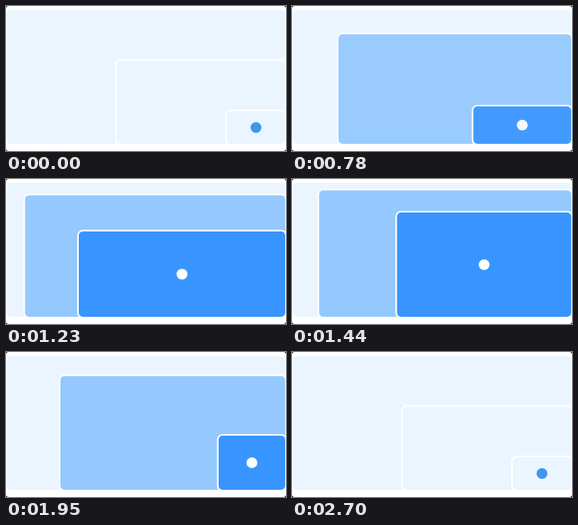
An HTML page with a canvas that plays this animation: 350x182 px, repeating every 2940 ms.

```html
<!DOCTYPE html>
<html lang="en">
<head>
<meta charset="utf-8">
<title>Nested cards</title>
<style>
  html, body { margin: 0; width: 100%; height: 100%; overflow: hidden; background: #000; }
  canvas { display: block; width: 350px; height: 182px; }
</style>
</head>
<body>
<canvas id="stage" width="350" height="182"></canvas>
<script>
const LOOP = 2940, RIGHT = 350, TOP = 4, BOTTOM = 174;
const ctx = document.getElementById('stage').getContext('2d');

const PALE = [235, 245, 255];
const MID = [149, 201, 253];
const BLUE = [56, 149, 255];
const DOT = [64, 149, 238];
const WHITE = [255, 255, 255];

// Dragged corner of the front card: time, x, y
const path = [
  [540, 275, 131], [780, 226, 125], [1020, 120, 100],
  [1230, 90, 65], [1440, 130, 41], [1700, 215, 52],
  [1950, 265, 104], [2280, 78, 111], [2610, 275, 131]
];

const lerp = (a, b, k) => a + (b - a) * k;
const ramp = (t, from, to) => Math.min(1, Math.max(0, (t - from) / (to - from)));
const smooth = k => k * k * (3 - 2 * k);
const mix = (a, b, k) => `rgb(${a.map((v, i) => Math.round(lerp(v, b[i], k)))})`;

function slope(i, axis) {
  if (i === 0 || i === path.length - 1) return 0;
  const before = path[i - 1], after = path[i + 1];
  return (after[axis] - before[axis]) / (after[0] - before[0]);
}

// Cubic Hermite curve through the path points
function along(t, axis) {
  const last = path.length - 1;
  if (t <= path[0][0]) return path[0][axis];
  if (t >= path[last][0]) return path[last][axis];
  const i = path.findIndex(p => p[0] > t) - 1;
  const a = path[i], b = path[i + 1];
  const span = b[0] - a[0], u = (t - a[0]) / span;
  return lerp(a[axis], b[axis], smooth(u))
    + span * u * (1 - u) * ((1 - u) * slope(i, axis) - u * slope(i + 1, axis));
}

function box(x, y, right, bottom, radius, fill) {
  ctx.beginPath();
  ctx.roundRect(x, y, right - x, bottom - y, radius);
  ctx.fillStyle = fill;
  ctx.fill();
}

function card(x, y, fill) {
  box(x, y, RIGHT, BOTTOM, 6, fill);
  ctx.strokeStyle = '#fff';
  ctx.lineWidth = 2;
  ctx.stroke();
}

function draw(t) {
  const active = ramp(t, 450, 800) * (1 - ramp(t, 2520, 2700));
  const pull = smooth(ramp(t, 450, 740)) * (1 - smooth(ramp(t, 2490, 2700)));
  const ratio = lerp(0.5, 0.253, pull);
  const x = along(t, 1), y = along(t, 2);

  ctx.fillStyle = '#000';
  ctx.fillRect(0, 0, 350, 182);
  box(0, 0, 350, 182, 3, '#fff');
  card(0, TOP, mix(PALE, PALE, 0));
  card(x * ratio, lerp(TOP, y, ratio), mix(PALE, MID, active));
  card(x, y, mix(PALE, BLUE, active));

  ctx.beginPath();
  ctx.arc((x + RIGHT) / 2, (y + BOTTOM) / 2, 6.8, 0, Math.PI * 2);
  ctx.fillStyle = mix(DOT, WHITE, active);
  ctx.fill();
}

const start = performance.now();
function tick() {
  draw((performance.now() - start) % LOOP);
  requestAnimationFrame(tick);
}
tick();
</script>
</body>
</html>
```
